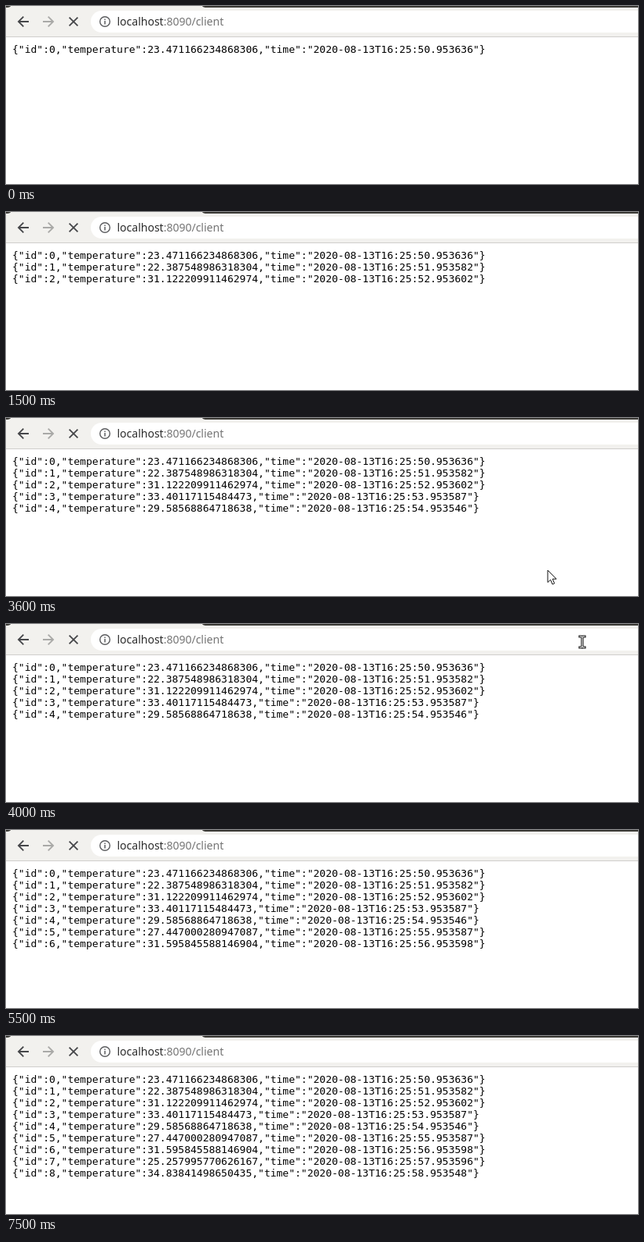
Write an HTML page that moves like this. It is 805 px wide and 228 px high and loops after 8 s.

```html
<!DOCTYPE html>
<html lang="en">
<head>
<meta charset="utf-8">
<title>Streaming JSON client</title>
<style>
  html, body { margin: 0; width: 100%; height: 100%; overflow: hidden; background: #fff; }
  svg { display: block; width: 805px; height: 228px; }
  .row { font: 13px "DejaVu Sans Mono", monospace; white-space: pre; fill: #000; }
  .url { font: 14px "Noto Sans", sans-serif; fill: #757575; }
  .host { fill: #2b2b2b; }
</style>
</head>
<body>
<svg viewBox="0 0 805 228">
  <rect width="805" height="228" fill="#fff"/>
  <rect width="805" height="39" fill="#f2f1ee"/>
  <rect y="39" width="805" height="1" fill="#cfcecb"/>
  <path d="M250 0H805V2H256Q251 2 250 0ZM0 0H6Q5 2 0 2Z" fill="#3c3b37"/>
  <rect x="108" y="6" width="740" height="28" rx="14" fill="#fff"/>

  <g fill="none" stroke-width="1.8">
    <path d="M29 20H16.5M22.3 13.6L15.9 20L22.3 26.4" stroke="#46474a"/>
    <path d="M47 20H59.5M53.7 13.6L60.1 20L53.7 26.4" stroke="#a9a9a7"/>
    <path d="M80.6 14.6L91.4 25.4M91.4 14.6L80.6 25.4" stroke="#46474a"/>
    <circle cx="126" cy="20" r="6.3" stroke="#5b5c5f" stroke-width="1.4"/>
    <path d="M126 19V23.6M126 16.4V17.9" stroke="#5b5c5f" stroke-width="1.5"/>
  </g>
  <text class="url" x="141.5" y="25"><tspan class="host">localhost</tspan>:8090/client</text>

  <g id="rows"></g>

  <g id="arrow" stroke="#111" stroke-linejoin="round">
    <path d="M0 0V15.5L3.6 12.2L6 18L8.6 16.9L6.2 11.2H11Z" fill="#fff"/>
  </g>
  <g id="beam" fill="none" stroke-linecap="square">
    <path id="stem" d="M-3 -7H-1.2L0 -6L1.2 -7H3M0 -6V6M-3 7H-1.2L0 6L1.2 7H3" stroke="#111" stroke-width="3.2"/>
    <use href="#stem" style="stroke:#fff"/>
    <path d="M-3 -7H-1.2L0 -6L1.2 -7H3M0 -6V6M-3 7H-1.2L0 6L1.2 7H3" stroke="#fff" stroke-width="1.1"/>
  </g>
</svg>
<script>
const LOOP = 8000;
const STEP = 100;

// Arrival time, temperature and seconds of each reading.
const readings = [
  [0, "23.471166234868306", "50.953636"],
  [500, "22.387548986318304", "51.953582"],
  [1500, "31.122209911462974", "52.953602"],
  [2500, "33.40117115484473", "53.953587"],
  [3600, "29.58568864718638", "54.953546"],
  [4500, "27.447000280947087", "55.953587"],
  [5500, "31.595845588146904", "56.953598"],
  [6600, "25.257995770626167", "57.953596"],
  [7500, "34.83841498650435", "58.953548"]
];

// Pointer path: time, x, y.
const path = [
  [3600, 690, 195], [3800, 722, 95], [4000, 734, 23],
  [4200, 604, 23], [4300, 604, 23], [4500, 540, 23], [4600, 500, 23]
];

const byId = id => document.getElementById(id);
const arrow = byId("arrow");
const beam = byId("beam");
document.querySelector("use").remove();

const rows = readings.map(([start, temperature, seconds], id) => {
  const text = document.createElementNS("http://www.w3.org/2000/svg", "text");
  text.setAttribute("class", "row");
  text.setAttribute("x", 8);
  text.setAttribute("y", 60 + 15 * id);
  text.textContent =
    `{"id":${id},"temperature":${temperature},"time":"2020-08-13T16:25:${seconds}"}`;
  byId("rows").append(text);
  return { text, start };
});

function show(element, visible) {
  element.setAttribute("visibility", visible ? "visible" : "hidden");
}

function pointerAt(time) {
  const next = path.findIndex(point => point[0] > time);
  if (next < 1) return null;
  const [t0, x0, y0] = path[next - 1];
  const [t1, x1, y1] = path[next];
  const part = (time - t0) / (t1 - t0);
  return [x0 + (x1 - x0) * part, y0 + (y1 - y0) * part];
}

function render(time) {
  for (const { text, start } of rows) show(text, time >= start);

  const pointer = pointerAt(Math.floor(time / STEP) * STEP);
  const overField = pointer !== null && pointer[1] < 34;
  show(beam, overField);
  show(arrow, pointer !== null && !overField);
  if (pointer) {
    (overField ? beam : arrow).setAttribute("transform", `translate(${pointer})`);
  }
}

const begin = performance.now();
function frame() {
  render((performance.now() - begin) % LOOP);
  requestAnimationFrame(frame);
}
frame();
</script>
</body>
</html>
```
